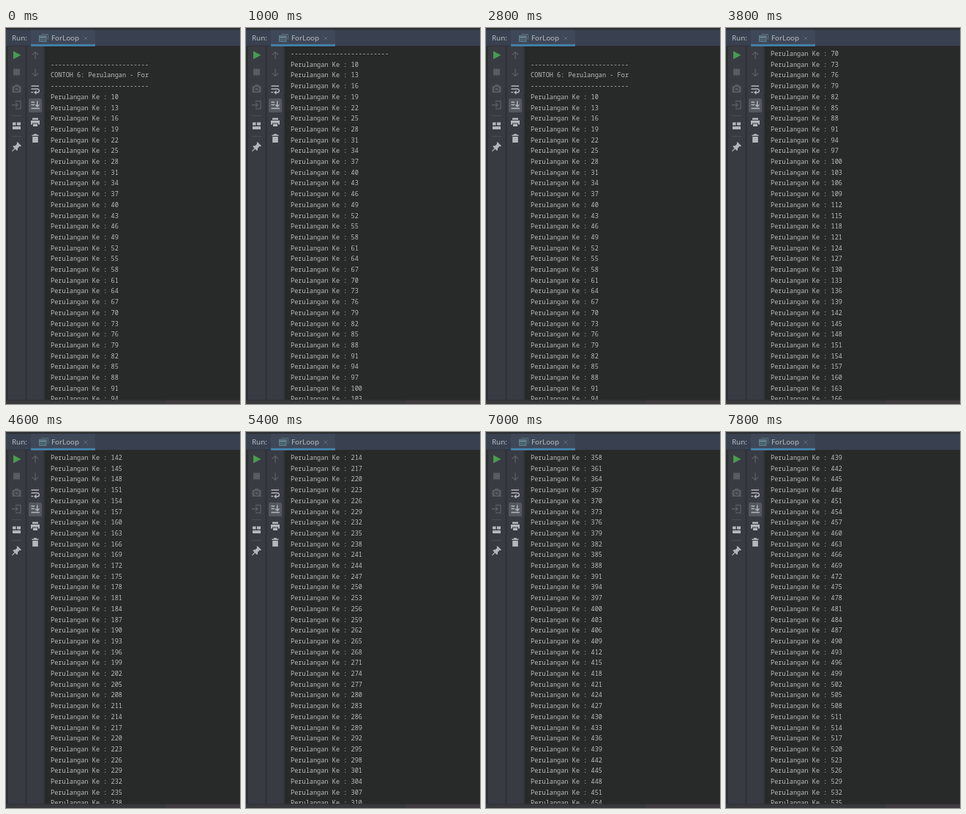
An HTML page that plays this animation: 320x512 px, repeating every 8 s.

```html
<!DOCTYPE html>
<html lang="id">
<head>
<meta charset="utf-8">
<title>ForLoop</title>
<style>
  html, body { margin: 0; width: 100%; height: 100%; overflow: hidden; background: #282929; }
  svg { display: block; width: 100vw; height: 100vh; }
  .ui { font: 9.8px "Noto Sans", "Open Sans", sans-serif; fill: #bcc0c5; }
  .out { font: 8.6px "Noto Sans Mono", "DejaVu Sans Mono", monospace; fill: #bcbcbc; white-space: pre; }
  .line { fill: none; stroke: #b4b7ba; stroke-width: 1.4; }
  .fill { fill: #b4b7ba; }
  .dim { stroke: #595c61; }
  .dimfill { fill: #595c61; }
</style>
</head>
<body>
<svg viewBox="0 0 320 512" preserveAspectRatio="none">
  <defs><clipPath id="console"><rect x="53" y="26" width="267" height="480.5"/></clipPath></defs>
  <rect width="320" height="512" fill="#282929"/>

  <!-- header and tab -->
  <rect width="320" height="3" fill="#2d2f33"/>
  <rect y="2.5" width="320" height="21.5" fill="#394150"/>
  <rect y="24" width="320" height="1" fill="#2e3136"/>
  <rect x="34" y="2.5" width="88" height="20" fill="#3f4858"/>
  <rect x="34" y="22" width="88" height="3" fill="#437fa6"/>
  <text class="ui" x="8" y="17">Run:</text>
  <text class="ui" x="62" y="17">ForLoop</text>
  <g fill="none" stroke="#647d8c">
    <path d="M48 8.5H57.5V16" stroke="#56707e"/>
    <rect x="45.5" y="10.5" width="9.5" height="8" fill="#4b6370"/>
    <path d="M45.5 12.5H55" stroke="#8197a3"/>
    <path d="M106.5 11.5l5 5m0-5l-5 5" stroke="#626974"/>
  </g>

  <!-- tool columns -->
  <rect y="25" width="53" height="487" fill="#393b43"/>
  <rect y="25" width="2.5" height="487" fill="#2c2d30"/>
  <rect x="26.5" y="25" width="2" height="482" fill="#2e3034"/>
  <rect x="51.5" y="25" width="1.5" height="482" fill="#303236"/>
  <path d="M8 119.5H21M8 147.5H21" stroke="#4b4e55"/>

  <path d="M10 31.5L20.5 37L10 42.5Z" fill="#479c4f"/>
  <rect class="dimfill" x="10" y="55.5" width="9" height="9"/>
  <path class="dimfill" d="M8.5 79H11.5L12.5 77H17L18 79H20.5V88H8.5Z"/>
  <circle cx="14.5" cy="83.3" r="2.6" fill="#595c61" stroke="#393b43" stroke-width="1.2"/>
  <path class="line dim" d="M13 99.5H20V110H13M8 104.7H16M13 101.7l3 3l-3 3"/>
  <path class="fill" d="M9 128.5H13.6V132.5H9ZM15 128.5H20V132.5H15ZM9 134H20V138H9Z"/>
  <path class="fill" d="M15.5 155L21 160.5L19.4 161.5L18.5 161L16.2 163.5L16 166.2L14.8 167L12.5 164.8L8.8 168.2L8 167.5L11.5 163.8L9.3 161.5L10 160.4L12.8 160.2L15.2 157.8L14.7 156.6Z"/>

  <path class="line dim" d="M40 42.5V32.5M36 36.5l4-4l4 4M40 55.5V65.5M36 61.5l4 4l4-4"/>
  <path class="line" d="M34.5 79H45M34.5 83H43a2.3 2.3 0 0 1 0 4.8H39.5M41.5 85.5l-2.4 2.3l2.4 2.3M34.5 87.5H37"/>
  <rect x="31" y="96" width="18" height="19" rx="2" fill="#555860"/>
  <path class="line" d="M34.5 101H39M34.5 104.5H39M34.5 109.5H46M42.8 99.5V107M40.2 104.4l2.6 2.6l2.6-2.6"/>
  <path class="fill" d="M36 122.5H44V125H36ZM34 126H46V131.5H44V129.5H36V131.5H34ZM37 130.5H43V134H37Z"/>
  <path class="fill" d="M35.5 145.5H38V144.3H42V145.5H44.5V147H35.5ZM36.2 148H43.8V156H36.2Z"/>

  <g id="rows" class="out" clip-path="url(#console)"></g>

  <!-- bottom strip -->
  <rect y="506.5" width="320" height="5.5" fill="#38393d"/>
  <rect y="506.5" width="320" height="1" fill="#303135"/>
  <rect x="218" y="507.5" width="102" height="4.5" fill="#403b3f"/>
</svg>
<script>
  const LOOP = 8000, STEP = 200, ROWS = 33, PITCH = 14.7;
  const rule = "-".repeat(26);
  const head = ["", rule, "CONTOH 6: Perulangan - For", rule];

  // [time, first visible line]: wheel turns near the top of the output
  const turns = [
    [0, 0], [200, 3], [400, 9], [800, 6], [1000, 3],
    [1600, 6], [1800, 9], [2000, 12], [2200, 9], [2400, 3],
    [2800, 0], [3000, 3], [3200, 6]
  ];

  const group = document.getElementById("rows");
  const rows = Array.from({ length: ROWS }, (_, i) => {
    const row = document.createElementNS("http://www.w3.org/2000/svg", "text");
    row.setAttribute("x", 61);
    row.setAttribute("y", (38 + i * PITCH).toFixed(2));
    return group.appendChild(row);
  });

  const lineText = n => n < head.length
    ? head[n]
    : "Perulangan Ke : " + (10 + 3 * (n - head.length));

  function firstLine(t) {
    if (t < 3400) return turns.filter(([at]) => at <= t).pop()[1];
    // steady scrolling, six lines per step, with one extra notch at the end
    const line = 12 + 6 * Math.floor((t - 3400) / STEP);
    return t >= 7800 ? line + 3 : line;
  }

  let shown = -1;
  function draw(t) {
    const first = firstLine(t);
    if (first === shown) return;
    shown = first;
    rows.forEach((row, i) => { row.textContent = lineText(first + i); });
  }

  const start = performance.now();
  function tick() {
    draw((performance.now() - start) % LOOP);
    requestAnimationFrame(tick);
  }
  tick();
</script>
</body>
</html>
```
